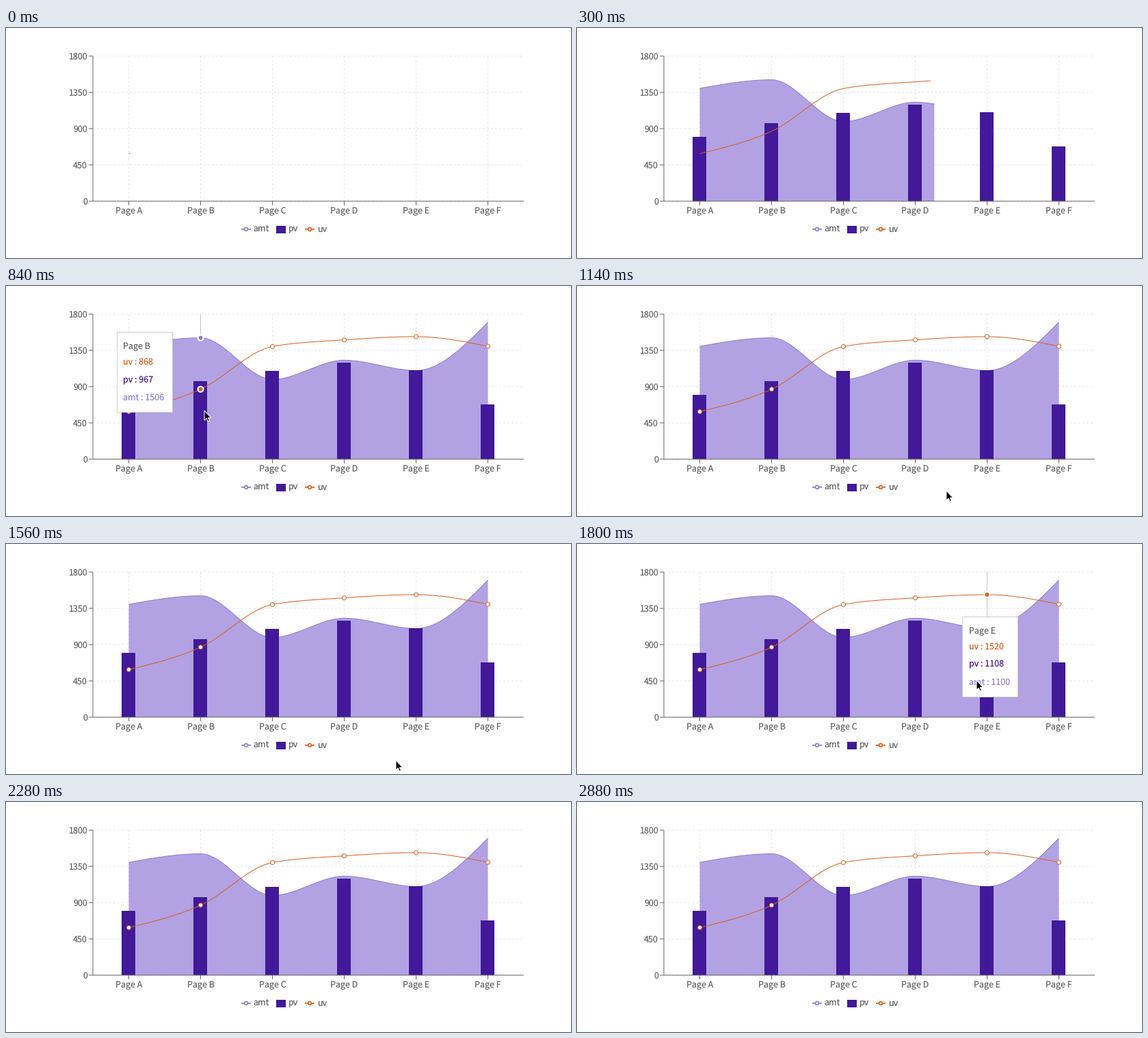
These frames come from a looping animation (826x336 px, 2.94 s). A matplotlib script:

```python
import numpy as np
import matplotlib.pyplot as plt
from matplotlib.animation import FuncAnimation
from matplotlib.patches import Circle, Polygon, Rectangle

W, H, DPI = 826, 336, 64
PX = 72 / DPI
STEP, FRAMES = 60, 49
LEFT, RIGHT, TOP, BOTTOM = 127, 757, 41, 253

PURPLE, FILL, INDIGO, ORANGE = "#8c80cb", "#b2a2e3", "#411999", "#d9601f"
GREY, GRID = "#666666", "#e6e6e6"

amt = np.array([1400, 1506, 989, 1228, 1100, 1700])
pv = np.array([800, 967, 1098, 1200, 1108, 680])
uv = np.array([590, 868, 1397, 1480, 1520, 1400])
pages = ["Page " + c for c in "ABCDEF"]
band = (RIGHT - LEFT) / len(pages)
centers = LEFT + band * (np.arange(len(pages)) + 0.5)

plt.rcParams.update({
    "font.family": "Noto Sans CJK JP",
    "text.hinting": "none",
    "toolbar": "None",
})
fig = plt.figure(figsize=(W / DPI, H / DPI), dpi=DPI, facecolor="white")
ax = fig.add_axes([0, 0, 1, 1])
ax.set(xlim=(0, W), ylim=(H, 0))
ax.axis("off")


def y_of(value):
    return BOTTOM - value * (BOTTOM - TOP) / 1800


def ease(t):
    """CSS 'ease': cubic-bezier(.25, .1, .25, 1)."""
    u = np.linspace(0, 1, 400)
    a, b = 3 * (1 - u) ** 2 * u, 3 * (1 - u) * u ** 2
    return float(np.interp(t, 0.25 * a + 0.25 * b + u ** 3, 0.1 * a + b + u ** 3))


def monotone(values):
    """Sample a monotone cubic through the band centers."""
    y = y_of(values)
    s = np.diff(y) / band
    mid = (s[:-1] + s[1:]) / 2
    inner = (np.sign(s[:-1]) + np.sign(s[1:])) * np.minimum(
        np.minimum(abs(s[:-1]), abs(s[1:])), abs(mid) / 2)
    m = np.r_[(3 * s[0] - inner[0]) / 2, inner, (3 * s[-1] - inner[-1]) / 2]
    xs = np.linspace(centers[0], centers[-1], 526)
    i = np.minimum(((xs - centers[0]) / band).astype(int), len(s) - 1)
    t = (xs - centers[i]) / band
    ys = ((2 * t**3 - 3 * t**2 + 1) * y[i] + (t**3 - 2 * t**2 + t) * band * m[i]
          + (3 * t**2 - 2 * t**3) * y[i + 1] + (t**3 - t**2) * band * m[i + 1])
    return xs, ys


def cut(xs, ys, key, limit):
    """Part of a curve where the rising key stays below limit."""
    keep = key < limit
    return (np.r_[xs[keep], np.interp(limit, key, xs)],
            np.r_[ys[keep], np.interp(limit, key, ys)])


def stroke(xs, ys, color, z, width=1, **kw):
    return ax.plot(xs, ys, color=color, lw=width * PX, zorder=z,
                   solid_capstyle="butt", dash_capstyle="butt", snap=False, **kw)[0]


def label(x, y, text, color=GREY, z=5, ha="left"):
    return ax.text(x, y, text, color=color, size=12.5 * PX, zorder=z,
                   ha=ha, va="baseline")


def dot(x, y, r, face, edge, z, width=1):
    return ax.add_patch(Circle((x, y), r, fc=face, ec=edge, lw=width * PX, zorder=z))


# Grid and axes
for v in range(0, 1801, 450):
    y = y_of(v)
    stroke([LEFT, RIGHT], [y, y], GRID, 1, dashes=(3, 3))
    stroke([LEFT - 6, LEFT], [y, y], GREY, 5)
    label(LEFT - 8, y + 5, str(v), ha="right")
for x, name in zip(centers, pages):
    stroke([x, x], [TOP, BOTTOM], GRID, 1, dashes=(3, 3))
    stroke([x, x], [BOTTOM, BOTTOM + 6], GREY, 5)
    label(x, 271, name, ha="center")
stroke([LEFT, RIGHT], [BOTTOM, BOTTOM], GREY, 5)
stroke([LEFT, LEFT], [TOP, BOTTOM], GREY, 5)

# Legend
for x, name, color in ((344, "amt", PURPLE), (395, "pv", INDIGO), (437, "uv", ORANGE)):
    if name == "pv":
        ax.add_patch(Rectangle((x, 289), 14, 10.5, fc=color, lw=0))
    else:
        stroke([x, x + 14], [294, 294], color, 3, 1.75)
        dot(x + 7, 294, 2.4, "white", color, 4, 1.75)
    label(x + 17.6, 297.6, name)

# Series
area_x, area_y = monotone(amt)
line_x, line_y = monotone(uv)
length = np.r_[0, np.cumsum(np.hypot(np.diff(line_x), np.diff(line_y)))]
area = ax.add_patch(Polygon([(0, 0), (0, 1), (1, 1)], fc=FILL, lw=0, zorder=2))
edge = stroke([], [], PURPLE, 2.5)
bars = [ax.add_patch(Rectangle((x - 10.5, BOTTOM), 20, 0, fc=INDIGO, lw=0, zorder=3))
        for x in centers]
line = stroke([], [], ORANGE, 6)
dots = [dot(x, y, 3, "white", ORANGE, 7) for x, y in zip(centers, y_of(uv))]

# Tooltip
guide = stroke([0, 0], [TOP, BOTTOM], "#c4c4c4", 1.5)
active = [dot(0, 0, 4, ORANGE, "white", 8, 2), dot(0, 0, 4, PURPLE, "white", 8, 2)]
box = ax.add_patch(Rectangle((0, 0), 81, 117, fc="white", ec="#cccccc", lw=PX, zorder=9))
rows = [label(0, 0, "", c, 10) for c in (GREY, ORANGE, INDIGO, "#8f7fdc")]
hover_parts = [guide, box, *active, *rows]

# Pointer
ARROW = np.array([(0, 0), (0, 14.2), (3.3, 11.2), (5.2, 15.8), (7.4, 14.8),
                  (5.4, 10.4), (9.7, 10.4)])
pointer = ax.add_patch(Polygon(ARROW, fc="black", ec="white", lw=PX, zorder=12))
TRACK = np.array([
    (660, 110, 334), (720, 165, 270), (780, 225, 215), (840, 290, 182),
    (900, 350, 176), (960, 415, 205), (1020, 475, 247), (1080, 510, 274),
    (1140, 540, 299), (1200, 556, 322), (1260, 566, 340), (1500, 568, 340),
    (1560, 570, 316), (1620, 572, 280), (1680, 574, 256), (1740, 577, 222),
    (1800, 584, 199), (1860, 592, 190), (1920, 596, 186), (2040, 597, 185),
])


def mouse(ms):
    if not TRACK[0, 0] <= ms < TRACK[-1, 0]:
        return None
    return tuple(np.interp(ms, TRACK[:, 0], TRACK[:, k]) for k in (1, 2))


def hovered(pos):
    if pos and LEFT <= pos[0] < RIGHT and TOP <= pos[1] < BOTTOM:
        return int((pos[0] - LEFT) // band)
    return None


def tip_width(i):
    return 81 if amt[i] >= 1000 else 74


def tip_goal(i, my):
    x = centers[i] + 10
    if x + tip_width(i) > RIGHT:
        x = centers[i] - 10 - tip_width(i)
    y = my + 10
    if y + 117 > BOTTOM:
        y = max(my - 127, TOP)
    return np.array([x, y])


def tip_path():
    """Tooltip place per frame: each new goal restarts an eased move."""
    start = goal = np.array([LEFT, TOP], float)
    begin, path = 0, []
    for n in range(FRAMES):
        ms = n * STEP
        here = start + (goal - start) * ease(min((ms - begin) / 185, 1))
        path.append(here)
        pos = mouse(ms)
        i = hovered(pos)
        if i is not None:
            new = tip_goal(i, pos[1])
            if not np.allclose(new, goal):
                start, goal, begin = here, new, ms
    return path


tips = tip_path()


def draw(n):
    ms = n * STEP
    grow = ease(np.clip((ms - 15) / 750, 0, 1))
    rise = ease(np.clip((ms - 15) / 200, 0, 1))

    xs, ys = cut(area_x, area_y, area_x, centers[0] + grow * (centers[-1] - centers[0]))
    area.set_xy(np.c_[np.r_[xs, xs[-1], xs[0]], np.r_[ys, BOTTOM, BOTTOM]])
    edge.set_data(xs, ys)
    line.set_data(*cut(line_x, line_y, length, min(grow * length[-1] + 2, length[-1])))
    for bar, v in zip(bars, pv):
        bar.set_height((y_of(v) - BOTTOM) * rise)
    for d in dots:
        d.set_visible(grow >= 1)

    pos = mouse(ms)
    pointer.set_visible(pos is not None)
    if pos:
        pointer.set_xy(ARROW + pos)

    i = hovered(pos)
    for part in hover_parts:
        part.set_visible(i is not None)
    if i is not None:
        x, y = tips[n]
        guide.set_xdata([centers[i]] * 2)
        for d, series in zip(active, (uv, amt)):
            d.center = centers[i], y_of(series[i])
        box.set_xy((x, y))
        box.set_width(tip_width(i))
        texts = (pages[i], f"uv : {uv[i]}", f"pv : {pv[i]}", f"amt : {amt[i]}")
        for row, text, dy in zip(rows, texts, (25, 47.5, 73.5, 99.5)):
            row.set_text(text)
            row.set_position((x + 9.5, y + dy))
    return [area, edge, line, pointer, *bars, *dots, *hover_parts]


anim = FuncAnimation(fig, draw, frames=FRAMES, interval=STEP, repeat=True,
                     repeat_delay=0, blit=False)
plt.show()
```
